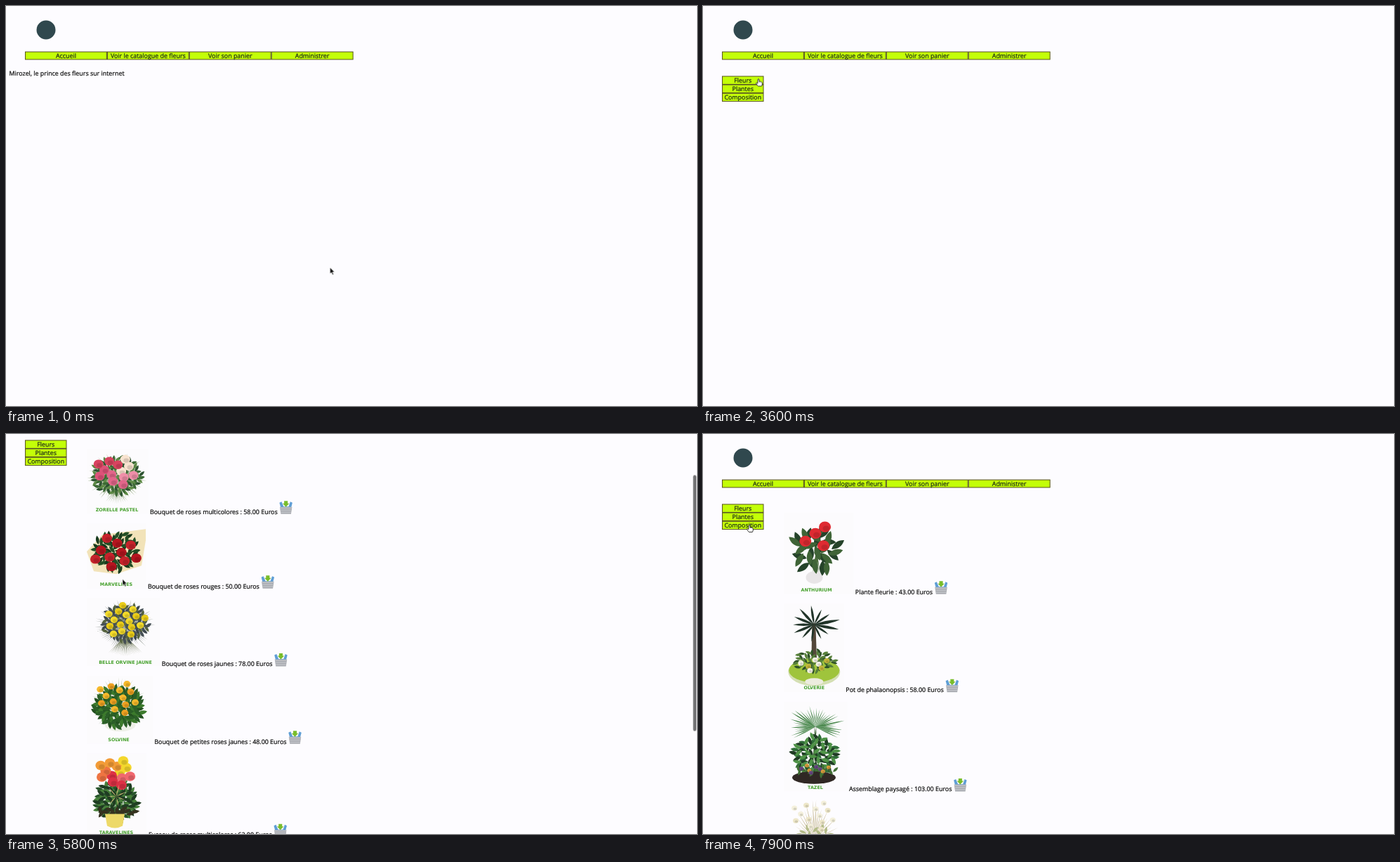
These frames come from a looping animation (984x569 px, 8000 ms). An HTML page:

```html
<!DOCTYPE html>
<html lang="fr">
<head>
<meta charset="utf-8">
<title>Boutique de fleurs</title>
<style>
@property --scroll { syntax: "<number>"; inherits: true; initial-value: 0; }
@property --view { syntax: "<number>"; inherits: true; initial-value: 0; }
@property --hand { syntax: "<number>"; inherits: true; initial-value: 0; }
html, body { margin: 0; width: 100%; height: 100%; overflow: hidden; background: #fdfcff; }
svg { display: block; width: 984px; height: 569px; animation: scroll 8s infinite, view 8s infinite step-end; }
text { font: 8.88px "Open Sans", "Noto Sans", sans-serif; fill: #0c0c0c; stroke: #0c0c0c; stroke-width: .22px; text-rendering: geometricPrecision; }
.button rect { fill: #c3ff08; stroke: #56521c; }
.button text { text-anchor: middle; fill: #1c2618; stroke: #1c2618; }
.caption { font: bold 6.4px "DejaVu Sans", sans-serif; fill: #45a02c; stroke: none; text-anchor: middle; }
#page { transform: translateY(calc(var(--scroll) * -1px)); }
#thumb { transform: translateY(calc(max(var(--scroll), 0) * .643px)); animation: thumb 8s infinite step-end; }

/* --view: 0 home, 1 menu, 2 flowers, 3 plants */
#home { opacity: calc(1 - var(--view)); }
#menu { opacity: var(--view); }
#flowers { opacity: min(var(--view) - 1, 3 - var(--view)); }
#plants { opacity: calc(var(--view) - 2); }
#cursor { animation: move 8s infinite, hand 8s infinite step-end; }
#arrow { opacity: calc(1 - var(--hand)); }
#hand { opacity: var(--hand); }

/* 1.25% is one 100 ms step */
@keyframes view { 0% { --view: 0; } 27.5% { --view: 1; } 48.75% { --view: 2; } 91.25%, 100% { --view: 3; } }
@keyframes hand { 0% { --hand: 0; } 25% { --hand: 1; } 36.25% { --hand: 0; } 43.75% { --hand: 1; } 57.5% { --hand: 0; } 83.75%, 100% { --hand: 1; } }
@keyframes thumb { 0% { opacity: 0; } 58.75% { opacity: 1; } 86.25%, 100% { opacity: 0; } }
@keyframes scroll {
  0%, 57.5% { --scroll: 0; animation-timing-function: steps(5); }
  63.75% { --scroll: 41.6; animation-timing-function: steps(4); }
  68.75% { --scroll: 112; animation-timing-function: steps(3); }
  72.5% { --scroll: 91; animation-timing-function: steps(5); }
  78.75%, 80% { --scroll: -.6; animation-timing-function: steps(1); }
  81.25%, 100% { --scroll: 0; }
}
@keyframes move {
  0%, 1.25% { transform: translate(461.5px, 372px); animation-timing-function: steps(9); }
  12.5% { transform: translate(205px, 86px); animation-timing-function: steps(10); }
  25%, 26.25% { transform: translate(176px, 75px); animation-timing-function: steps(3); }
  30%, 33.75% { transform: translate(173.5px, 72px); animation-timing-function: steps(10); }
  46.25%, 56.25% { transform: translate(68.5px, 107px); animation-timing-function: steps(4); }
  61.25%, 73.75% { transform: translate(166px, 206.5px); animation-timing-function: steps(5); }
  80% { transform: translate(90.5px, 142px); animation-timing-function: steps(4); }
  85%, 93.75% { transform: translate(66px, 117px); animation-timing-function: steps(4); }
  98.75%, 100% { transform: translate(66px, 129px); }
}
</style>
</head>
<body>
<svg viewBox="0 0 984 569">
  <defs>
    <g id="basket">
      <path d="M0 2.5L3 1 6 8H13L15.5 1 18.5 2.5 16.5 10H2Z" fill="#5f9ed6"/>
      <path d="M.5 8.5H18L16.5 18.5H2Z" fill="#a9abb1"/>
      <path d="M1 10H17.5M2 13H16.5M2 16H16.5" stroke="#d5d7dc" stroke-width=".8"/>
      <path d="M6.7 0H11.8V3.5H14L9.2 8.5 4.5 3.5H6.7Z" fill="#79bd2b"/>
    </g>
  </defs>
  <g id="page">
    <circle cx="57" cy="34" r="13.5" fill="#30484e"/>
    <g id="nav"></g>
    <text id="home" x="4.5" y="99.3">Mirozel, le prince des fleurs sur internet</text>
    <g id="menu"></g>
    <g id="flowers"></g>
    <g id="plants"></g>
  </g>
  <rect id="thumb" x="978.5" width="4.6" height="364" rx="2.3" fill="#727274"/>
  <g id="cursor">
    <path id="arrow" d="M0 0V8.8L2 7 3.6 10.4 5 9.8 3.5 6.5H6.2Z" fill="#111" stroke="#fff" stroke-width=".5"/>
    <path id="hand" d="M-1 1Q0-.6 1 1V4.2Q4 3.6 5.2 5.4 6 8 4.4 10.5H-.6Q-2.8 8-3.6 6.2-3 5-1 6.6Z" fill="#fff" stroke="#222" stroke-width=".9"/>
  </g>
</svg>
<script>
const el = id => document.getElementById(id);
let seed = 7;
const rand = (a, b) => {
  seed = (seed * 16807) % 2147483647;
  return a + (b - a) * seed / 2147483647;
};
const list = (n, fn) => Array.from({ length: n }, (_, i) => fn(i));
const fix = (...nums) => nums.map(n => n.toFixed(1)).join(" ");
const shape = (d, fill) => `<path d="${d}" fill="${fill}"/>`;
const oval = (x, y, rx, ry, fill) => `<ellipse cx="${fix(x)}" cy="${fix(y)}" rx="${rx}" ry="${ry}" fill="${fill}"/>`;

// Pointed leaf from (x, y) along (dx, dy); w is its relative width
const leaf = (x, y, dx, dy, w) =>
  `M${fix(x, y)}q${fix(dx / 2 - dy * w, dy / 2 + dx * w, dx, dy)} ${fix(dy * w - dx / 2, -dy / 2 - dx * w, -dx, -dy)}`;

// Even sunflower spread over an ellipse: [x, y, angle]
const scatter = (n, y, rx, ry, turn = 0) => list(n, i => {
  const a = i * 2.4 + turn, k = Math.sqrt((i + .5) / n);
  return [Math.cos(a) * rx * k, y + Math.sin(a) * ry * k, a];
});

// Blades from one centre out to an ellipse
const fan = (y, rx, ry, n, w, color, from = 0, to = 6.28) =>
  shape(list(n, i => {
    const a = from + (to - from) * (i + .5) / n, k = rand(.65, 1);
    return leaf(0, y, Math.cos(a) * rx * k, Math.sin(a) * ry * k, w);
  }).join(""), color);

// Layers of leaves, each tone with its own turn
const foliage = (y, rx, ry, n, len, tones) =>
  tones.map((tone, t) => shape(scatter(n, y, rx, ry, t * 1.3).map(([x, py, a]) => {
    const b = a + rand(-.9, .9), dx = Math.cos(b) * len, dy = Math.sin(b) * len;
    return leaf(x - dx / 2, py - dy / 2, dx, dy, .38);
  }).join(""), tone)).join("");

const blooms = (n, y, rx, ry, r, colors, turn = 0) =>
  scatter(n, y, rx, ry, turn).map(([x, py], i) =>
    oval(x, py, r, r * .9, colors[i % colors.length]) +
    oval(x + r * .2, py + r * .25, r * .55, r * .45, "#0002")).join("");

const stems = (top, bottom, spread, n, color) =>
  shape(list(n, i => {
    const d = (i / (n - 1) * 2 - 1) * spread;
    return leaf(-d * .4, top, d * 1.4, bottom - top - Math.abs(d) * .25, .02);
  }).join(""), color);

// Drawings are centred on x = 0 and start at y = 0
const pastel = () =>
  fan(40, 44, 37, 60, .04, "#8ba276") + stems(50, 79, 16, 11, "#64844a") +
  foliage(38, 36, 27, 36, 11, ["#2c5230", "#5d8a45", "#3c6a35"]) +
  blooms(13, 32, 31, 21, 7, ["#f8e3cf", "#e2668a", "#d8435f", "#ef8ea8", "#dd5279"]);

const reds = () =>
  shape("M-42 40L-20 16 42 8V24L36 60 0 72-32 68Z", "#f2e3b9") +
  foliage(40, 34, 27, 34, 13, ["#173a1e", "#234f26"]) +
  blooms(10, 41, 33, 26, 7.3, ["#b5141f", "#c6222b"]);

const yellows = () =>
  fan(40, 44, 40, 80, .025, "#717b74") + stems(46, 84, 24, 21, "#818a6c") +
  foliage(36, 33, 26, 34, 11, ["#3c474c", "#56633f", "#454f55"]) +
  blooms(16, 33, 31, 23, 5.2, ["#f3da2a", "#e9cc18"]);

const ambers = () =>
  fan(40, 43, 40, 50, .03, "#9fb490") + oval(2, 70, 22, 9, "#eef0e8") +
  foliage(44, 35, 28, 32, 15, ["#23501f", "#3c7a2c", "#2b5f27"]) +
  blooms(13, 31, 31, 24, 5, ["#f6b92b", "#eda021"]);

const tall = () =>
  stems(25, 90, 14, 12, "#3f7a32") +
  foliage(68, 30, 28, 34, 13, ["#28552b", "#47803a", "#1f3d22"]) +
  foliage(84, 28, 6, 14, 13, ["#35321f"]) +
  shape("M-16 86H12L9 103Q-2 109-13 103Z", "#edd968") +
  blooms(13, 27, 26, 20, 7.5, ["#f4d72c", "#dd3145", "#f29b37", "#f0686e", "#ee7442"]) +
  fan(61, 20, 18, 7, .07, "#dcc17e");

const anthurium = () =>
  stems(40, 92, 6, 7, "#496b3b") + oval(-3, 92, 12, 9, "#e8e5e7") +
  foliage(52, 33, 32, 15, 22, ["#25432a", "#3f6437"]) +
  blooms(4, 38, 20, 25, 8.5, ["#df2b32"], 4.5);

const dish = () =>
  shape("M-3 28L2 28 4 88H-4Z", "#54483a") + fan(30, 38, 29, 13, .12, "#22352a") +
  oval(0, 97, 37, 20, "#d4dfb3") + oval(0, 95, 36, 17, "#9fc43c") +
  foliage(82, 30, 15, 24, 10, ["#2f5228", "#57803a"]) + oval(0, 111, 13, 5, "#ececdf") +
  blooms(7, 86, 24, 10, 4, ["#f3f1e4", "#c3b53b"]);

const palm = () =>
  fan(36, 44, 34, 32, .045, "#4d8a50", 2.5, 6.9) + stems(34, 104, 6, 6, "#42653a") +
  foliage(76, 32, 27, 28, 13, ["#2f6d38", "#203c25", "#4f9347"]) +
  oval(-2, 108, 31, 9, "#302824") + foliage(98, 30, 7, 14, 10, ["#416f34"]) +
  blooms(8, 96, 27, 6, 3, ["#684783", "#d99b3c"]);

const orchid = () =>
  fan(58, 42, 60, 20, .02, "#c4b68e", 3.4, 6) + foliage(48, 28, 9, 12, 11, ["#b3bb88"]) +
  blooms(13, 24, 34, 22, 4, ["#f4f0dc", "#ede6c8"]);

const place = (draw, x, y) => `<g transform="translate(${x} ${y})">${draw()}</g>`;

// Rows flow downwards; the label sits on the bottom line of its picture
const catalogue = (id, rows) => {
  let top = 112;
  el(id).innerHTML = rows.map(([draw, name, label, w, h, cx]) => {
    const y = top, base = y + h;
    top = base + 13.8;
    return `<rect x="115" y="${y}" width="${w}" height="${h}" fill="#fcfbfd"/>` + place(draw, cx, y) +
      `<text class="caption" x="${cx}" y="${base - 3.7}">${name}</text>` +
      `<text class="label" x="${117.5 + w}" y="${base}">${label} Euros</text>`;
  }).join("");
  for (const t of el(id).querySelectorAll(".label")) {
    const x = +t.getAttribute("x") + t.getComputedTextLength() + 2.7;
    t.insertAdjacentHTML("afterend", `<use href="#basket" x="${x}" y="${t.getAttribute("y") - 18.3}"/>`);
  }
};

const button = (x, y, w, h, label) =>
  `<g class="button"><rect x="${x}" y="${y}" width="${w}" height="${h}"/><text x="${x + w / 2}" y="${y + 8.7}">${label}</text></g>`;

el("nav").innerHTML = ["Accueil", "Voir le catalogue de fleurs", "Voir son panier", "Administrer"]
  .map((s, i) => button(27.5 + i * 116.9, 65.2, 115.9, 10.8, s)).join("");
el("menu").innerHTML = ["Fleurs", "Plantes", "Composition"]
  .map((s, i) => button(27.5, 100 + i * 12.1, 58.5, 11.4, s)).join("");

catalogue("flowers", [
  [pastel, "ZORELLE PASTEL", "Bouquet de roses multicolores : 58.00", 87.5, 92.5, 158],
  [reds, "MARVELINES", "Bouquet de roses rouges : 50.00", 84.5, 92.2, 157],
  [yellows, "BELLE ORVINE JAUNE", "Bouquet de roses jaunes : 78.00", 104.2, 97, 170],
  [ambers, "SOLVINE", "Bouquet de petites roses jaunes : 48.00", 93.8, 96.5, 160.5],
  [tall, "TARAVELINES", "Fuseau de roses multicolores : 63.00", 85.5, 118.6, 157],
]);
catalogue("plants", [
  [anthurium, "ANTHURIUM", "Plante fleurie : 43.00", 99.3, 115.5, 161.5],
  [dish, "OLVERIE", "Pot de phalaonopsis : 58.00", 85.8, 125.7, 158.3],
  [palm, "TAZEL", "Assemblage paysagé : 103.00", 90.5, 127.4, 160],
]);
el("plants").innerHTML += place(orchid, 159, 519);
</script>
</body>
</html>
```
